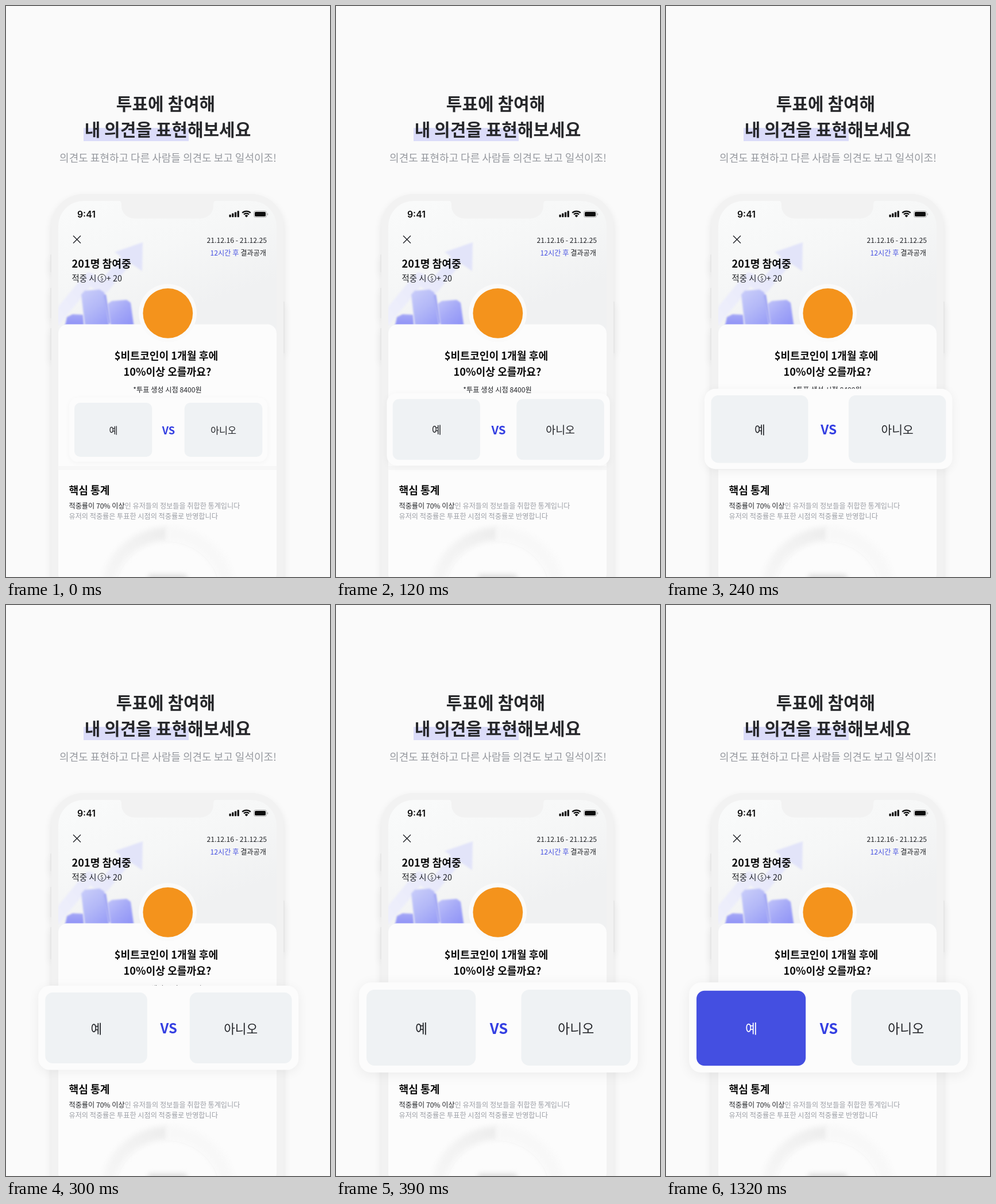
These frames come from a looping animation (564 px wide and 993 px high, 2.46 s). An HTML page with a canvas:

```html
<!DOCTYPE html>
<html lang="ko">
<head>
<meta charset="utf-8">
<title>투표</title>
<style>
  html, body { margin: 0; width: 100%; height: 100%; overflow: hidden; background: #fafafa; }
  canvas { display: block; }
</style>
</head>
<body>
<canvas id="stage" width="564" height="993"></canvas>
<script>
const ctx = document.getElementById('stage').getContext('2d');
const LOOP = 2460, STEP = 30, GROW_STEPS = 13, PRESS = 1290;
const KOREAN = '"Noto Sans CJK KR", "Noto Sans KR", "Noto Sans CJK JP", sans-serif';
const BLUE = '#444fe1', INK = '#222428', GREY = '#9b9ea5', SHEET = '#fcfcfc', BEZEL = '#f2f2f2';

function text(str, x, y, size, weight, color, align = 'left', family = KOREAN) {
  ctx.font = `${weight} ${size}px ${family}`;
  ctx.textAlign = align;
  ctx.fillStyle = color;
  ctx.fillText(str, x, y);
  return ctx.measureText(str).width;
}

function box(x, y, w, h, radius, color) {
  ctx.beginPath();
  ctx.roundRect(x, y, w, h, radius);
  ctx.fillStyle = color;
  ctx.fill();
}

function disc(x, y, r, color) {
  ctx.beginPath();
  ctx.arc(x, y, r, 0, 7);
  ctx.fillStyle = color;
  ctx.fill();
}

function path(points, close) {
  ctx.beginPath();
  points.forEach(([x, y]) => ctx.lineTo(x, y));
  if (close) ctx.closePath();
}

function stroke(color, width) {
  ctx.strokeStyle = color;
  ctx.lineWidth = width;
  ctx.stroke();
}

function fade(x0, y0, x1, y1, ...colors) {
  const g = ctx.createLinearGradient(x0, y0, x1, y1);
  colors.forEach((c, i) => g.addColorStop(i / (colors.length - 1), c));
  return g;
}

function shadow(color, blur, dy) {
  ctx.shadowColor = color;
  ctx.shadowBlur = blur;
  ctx.shadowOffsetY = dy;
}

function layer(draw) {
  ctx.save();
  draw();
  ctx.restore();
}

function headline() {
  box(135, 212, 183, 23, 0, '#dbdcf9');
  text('투표에 참여해', 278, 180.5, 30, 700, '#27282b', 'center');
  text('내 의견을 표현해보세요', 281.5, 225.5, 30, 700, '#27282b', 'center');
  text('의견도 표현하고 다른 사람들 의견도 보고 일석이조!', 282, 270.5, 18, 400, '#96999f', 'center');
}

function phoneBody() {
  layer(() => {
    shadow('rgba(0,0,0,.09)', 14, 6);
    [[432, 31], [490, 53], [560, 56]].forEach(([y, h]) => box(77, y, 4, h, 1, '#f0f0f0'));
    box(481, 514, 4, 90, 1, '#f0f0f0');
    box(79, 327, 404, 760, 56, BEZEL);
  });
}

function chart() {
  layer(() => {
    ctx.filter = 'blur(1.5px)';
    ctx.lineJoin = 'round';
    path([[84, 548], [145, 474], [169, 490], [213, 437]]);
    stroke(fade(90, 540, 220, 430, '#eeeffb', '#e9eafa', '#e0e2f9'), 21);
    path([[189, 428], [238, 411], [237, 461]], true);
    ctx.fillStyle = '#e2e4f9';
    ctx.fill();
    path([[102, 560], [106, 541], [116, 536], [134, 537], [136, 560]], true);
    ctx.fillStyle = fade(0, 536, 0, 556, '#a5a8f6', '#8f92f6');
    ctx.fill();
    path([[138, 560], [131, 502], [137, 495], [163, 493], [171, 498], [180, 560]], true);
    ctx.fillStyle = fade(132, 495, 178, 554, '#c9cdf9', '#b3b8f7', '#979cf6');
    ctx.fill();
    path([[183, 560], [177, 518], [184, 513], [210, 511], [217, 516], [223, 560]], true);
    ctx.fillStyle = fade(178, 511, 220, 556, '#c0c3f8', '#a4a8f7', '#8e92f6');
    ctx.fill();
    path([[172, 502], [180, 552]]);
    stroke('#9da2f4', 4);
  });
}

function gauge() {
  layer(() => {
    ctx.filter = 'blur(4px)';
    ctx.beginPath();
    ctx.arc(281, 1024, 106, Math.PI, Math.PI * 1.5);
    stroke(fade(165, 990, 292, 912, '#f6f6f6', '#f2f2f2', '#ececec'), 23);
    ctx.beginPath();
    ctx.arc(281, 1024, 106, Math.PI * 1.5, Math.PI * 2);
    stroke('#f8f8f8', 25);
    box(247, 989, 68, 12, 5, '#dedede');
  });
  ctx.beginPath();
  ctx.arc(281, 1024, 92, Math.PI, Math.PI * 2);
  stroke('#f8f8f8', 2);
}

function statusBar() {
  text('9:41', 124, 367.5, 15.8, 600, '#0c0c0c', 'left', 'Inter, sans-serif');
  for (let i = 0; i < 4; i++) {
    const h = 4.5 + i * 2.2;
    box(388.5 + i * 4.7, 367.3 - h, 3.2, h, 0.8, '#0c0c0c');
  }
  [10.2, 6.4].forEach(r => {
    ctx.beginPath();
    ctx.arc(418.5, 367, r, Math.PI * 1.25, Math.PI * 1.75);
    stroke('#0c0c0c', 2.3);
  });
  ctx.beginPath();
  ctx.moveTo(418.5, 367.5);
  ctx.arc(418.5, 367.5, 4, Math.PI * 1.25, Math.PI * 1.75);
  ctx.fillStyle = '#0c0c0c';
  ctx.fill();
  ctx.beginPath();
  ctx.roundRect(431.5, 356.5, 22, 11, 3);
  stroke('#aaaaaa', 1);
  box(433, 358, 19, 8, 1.8, '#0c0c0c');
  box(454.7, 360.2, 1.4, 3.8, 0.7, '#aaaaaa');
}

function notch() {
  ctx.beginPath();
  ctx.moveTo(195, 338);
  ctx.quadraticCurveTo(201, 338, 201, 345);
  ctx.arcTo(201, 369.5, 225, 369.5, 22);
  ctx.arcTo(361, 369.5, 361, 345, 22);
  ctx.lineTo(361, 345);
  ctx.quadraticCurveTo(361, 338, 367, 338);
  ctx.fillStyle = BEZEL;
  ctx.fill();
}

function screen() {
  layer(() => {
    ctx.beginPath();
    ctx.roundRect(91, 339, 380, 760, 44);
    ctx.clip();
    box(91, 339, 380, 230, 0, fade(150, 339, 230, 560, '#f9fafa', '#f6f7f7', '#f0f1f2'));
    chart();
    box(91, 553.5, 380, 450, 16, SHEET);
    box(91, 800, 380, 7, 0, '#f7f7f7');
    gauge();
  });
  notch();
  statusBar();
}

function screenText() {
  path([[117, 399.5], [130, 412.5]]);
  stroke(INK, 1.4);
  path([[130, 399.5], [117, 412.5]]);
  stroke(INK, 1.4);
  text('21.12.16 - 21.12.25', 454, 411.7, 12.2, 500, INK, 'right');
  const w = text(' 결과공개', 453, 434, 12.2, 500, INK, 'right');
  text('12시간 후', 453 - w, 434, 12.2, 500, BLUE, 'right');

  text('201명 참여중', 114.5, 455.3, 18.2, 700, '#0b0b0b');
  text('적중 시', 114.5, 479, 14.4, 400, INK);
  ctx.beginPath();
  ctx.arc(167, 473.3, 6.8, 0, 7);
  stroke(INK, 1);
  text('$', 167, 476.8, 9.5, 400, INK, 'center');
  text('+ 20', 174.8, 479, 14.4, 400, INK);

  disc(281.5, 534, 50.5, '#fafafa');
  disc(281.8, 534.3, 43.4, '#f4931c');

  text('$비트코인이 1개월 후에', 279, 615.3, 18.2, 700, '#0b0b0b', 'center');
  text('10%이상 오를까요?', 281, 643, 18.2, 700, '#0b0b0b', 'center');
  text('*투표 생성 시점 8400원', 281, 671.7, 12.2, 400, INK, 'center');

  text('핵심 통계', 109.5, 849.3, 18.2, 700, '#0b0b0b');
  const lead = text('적중률이 70% 이상', 109.5, 874, 12.15, 500, INK);
  text('인 유저들의 정보들을 취합한 통계입니다', 109.5 + lead, 874, 12.15, 400, GREY);
  text('유저의 적중률은 투표한 시점의 적중률로 반영합니다', 109.5, 892, 12.15, 400, GREY);
}

// Drawn around its own centre so that it grows as one piece.
function voteCard(grow, press) {
  layer(() => {
    const scale = 1 + 0.405 * grow;
    ctx.translate(282.5 + 0.3 * grow, 737 - 2 * grow);
    ctx.scale(scale, scale);
    layer(() => {
      shadow(`rgba(0,0,0,${0.035 + 0.03 * grow})`, 10 + 12 * grow, 2 + 2 * grow);
      box(-172.7, -56, 345.4, 111.6, 15, SHEET);
    });
    const fills = ['#eff2f4', '#b9bbed', BLUE];
    box(-163.5, press ? -45.8 : -47, 135.3, press ? 93 : 94, 10, fills[press]);
    box(28.2, -47, 135.6, 94, 10, '#eff2f4');
    if (press === 1) {
      ctx.font = `500 16.3px ${KOREAN}`;
      ctx.textAlign = 'center';
      ctx.lineJoin = 'round';
      ctx.strokeStyle = '#9b9cb6';
      ctx.lineWidth = 1.3;
      ctx.strokeText('예', -95.6, 7);
    }
    text('예', -95.6, 7, 16.3, 500, [INK, '#b6b8e2', '#ffffff'][press], 'center');
    text('아니오', 96, 7, 16.3, 500, INK, 'center');
    text('VS', 0.4, 7.5, 18.2, 700, '#343fe2', 'center');
  });
}

function draw(step) {
  ctx.fillStyle = '#fafafa';
  ctx.fillRect(0, 0, 564, 993);
  headline();
  phoneBody();
  screen();
  screenText();
  const pressStep = step - PRESS / STEP;
  voteCard(Math.min(step / GROW_STEPS, 1), pressStep < 0 ? 0 : pressStep < 1 ? 1 : 2);
}

let shown = -1;
function tick() {
  const step = Math.floor(performance.now() % LOOP / STEP);
  if (step !== shown) draw(shown = step);
  requestAnimationFrame(tick);
}
tick();
</script>
</body>
</html>
```
